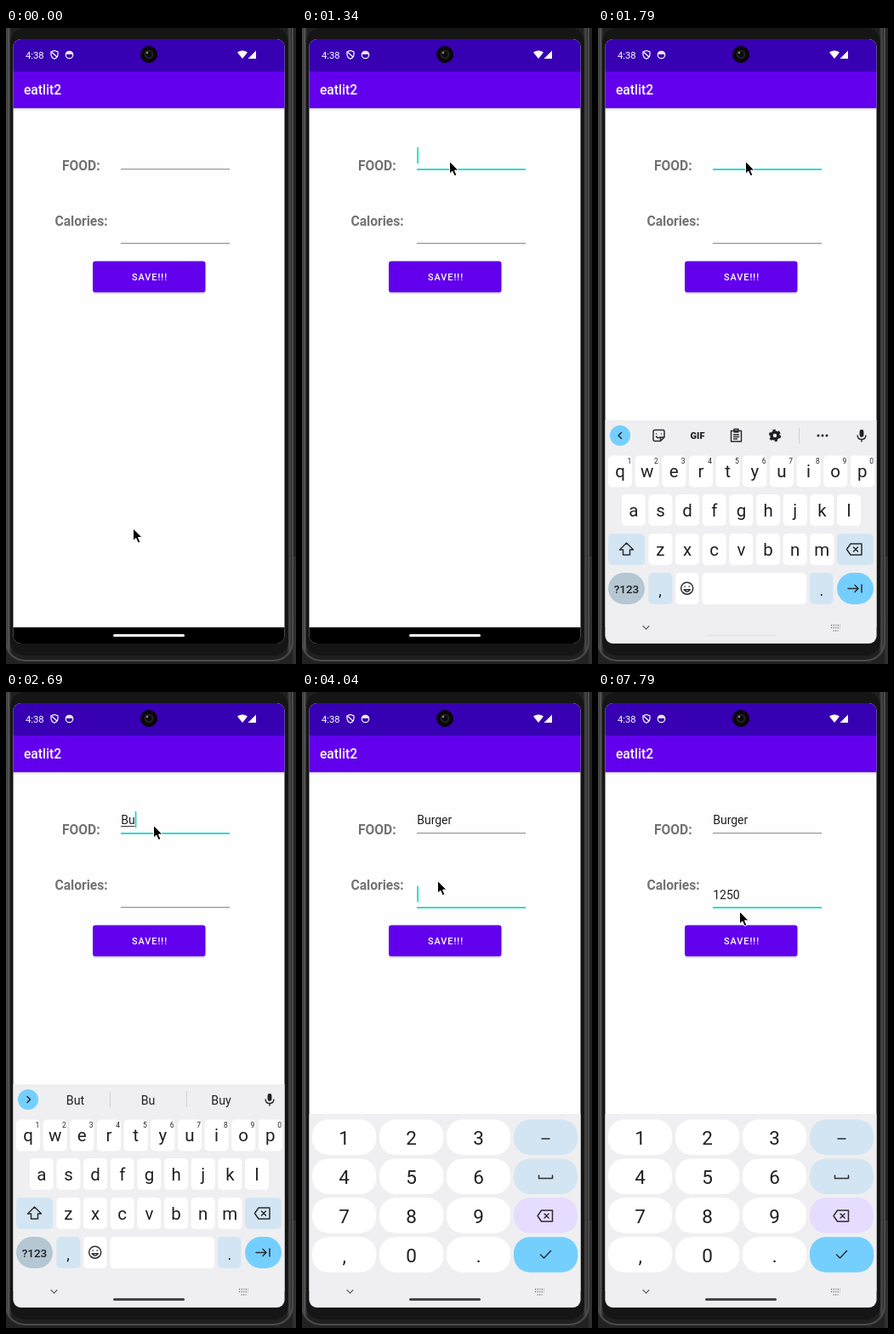
An HTML page that plays this animation: 341x746 px, repeating every 8 s.

```html
<!DOCTYPE html>
<html lang="en">
<head>
<meta charset="utf-8">
<title>Calorie form</title>
<style>
html, body { margin: 0; width: 100%; height: 100%; overflow: hidden; background: #1c1c1c; }
svg { display: block; width: 100%; height: 100%; font-family: Roboto, Arial, sans-serif; }
.mid { text-anchor: middle; }
.icon { fill: none; stroke: #2b2d30; stroke-width: 1.5; stroke-linecap: round; stroke-linejoin: round; }
</style>
</head>
<body>
<svg viewBox="0 0 341 746">
  <defs>
    <clipPath id="screen"><rect x="8.5" y="13" width="319" height="709" rx="9"/></clipPath>
    <linearGradient id="side">
      <stop offset="0" stop-color="#181818"/><stop offset=".008" stop-color="#5a5a5a"/>
      <stop offset=".018" stop-color="#202020"/><stop offset=".98" stop-color="#202020"/>
      <stop offset=".99" stop-color="#4a4a4a"/><stop offset="1" stop-color="#181818"/>
    </linearGradient>
    <linearGradient id="fade" x2="0" y2="1">
      <stop offset="0" stop-color="#000" stop-opacity=".2"/><stop offset="1" stop-color="#000" stop-opacity="0"/>
    </linearGradient>
  </defs>

  <!-- phone body -->
  <rect width="341" height="746" fill="#222"/>
  <rect x="337" y="620" width="4" height="126" fill="#303030"/>
  <rect x="0" y="-40" width="337" height="782" rx="22" fill="url(#side)" stroke="#4b4b4b" stroke-width="2"/>
  <rect x="5" y="0" width="327" height="736" rx="16" fill="#151515"/>

  <g clip-path="url(#screen)">
    <rect x="8" y="13" width="320" height="709" fill="#fefefe"/>
    <rect x="8" y="13" width="320" height="38" fill="#3700b3"/>
    <rect x="8" y="51" width="320" height="43" fill="#6200ee"/>
    <rect x="8" y="94" width="320" height="3" fill="url(#fade)"/>
    <rect x="8" y="703" width="320" height="19"/>

    <g fill="#fff">
      <text x="23" y="36" font-size="11.2">4:38</text>
      <path d="M272 28.5Q278 24.5 284 28.5L278 36ZM294 26.5V36H284.5Z"/>
      <text x="21" y="78" font-size="15.6" font-weight="500">eatlit2</text>
    </g>
    <g fill="none" stroke="#fff" stroke-width="1.2">
      <path d="M57 26.5L61 28V31Q61 34.5 57 36.3Q53 34.5 53 31V28ZM54 28.5L60 34"/>
      <circle cx="74.5" cy="31.5" r="4.2"/><path d="M71 29.5H78" stroke-width="2.4"/>
    </g>
    <circle cx="168" cy="31" r="10" fill="#080808"/>
    <circle cx="168" cy="31" r="5.5" fill="#202020"/>
    <circle cx="168" cy="31" r="3.2" fill="#080808"/>
    <circle cx="166" cy="29" r="1.5" fill="#777"/>

    <g font-size="15.6" font-weight="700" fill="#737373">
      <text x="66" y="167">FOOD:</text><text x="57.5" y="231.5">Calories:</text>
    </g>
    <rect id="line0" x="135" y="165" width="128"/>
    <rect id="line1" x="135" y="252" width="128"/>
    <g font-size="14" fill="#202020">
      <text id="text0" x="135.2" y="155"></text><text id="text1" x="135.2" y="242.5"></text>
    </g>
    <rect id="compose" x="135" y="157" height="1" fill="#333"/>
    <rect id="caret" width="1.6" height="19" fill="#03dac5"/>

    <rect x="102" y="275" width="132.5" height="37" rx="3.5" fill="#000" opacity=".16"/>
    <rect x="102" y="273.5" width="132.5" height="36.5" rx="3" fill="#6200ee"/>
    <text class="mid" x="169" y="296.4" font-size="10.9" font-weight="500" letter-spacing=".97" fill="#fff">SAVE!!!</text>

    <g id="letters"></g>
    <g id="numbers"></g>
    <rect id="pill" x="126" y="711" width="84" height="3" rx="1.5"/>
  </g>
  <path id="mouse" d="M0 0V14.5L3.3 11.5L5.8 17L8.4 15.9L6 10.5H10.6Z" fill="#000" stroke="#fff" stroke-width="1"/>
</svg>

<script>
const $ = id => document.getElementById(id);
const INK = "#1f2023", PALE = "#d3e5f2", SKY = "#74cfff", TEAL = "#03dac5";

const key = (x, y, w, h, r, fill = "#fff") =>
  `<rect x="${x}" y="${y}" width="${w}" height="${h}" rx="${r}" fill="${fill}"/>`;
const label = (s, x, y, size, extra = "") =>
  `<text class="mid" x="${x}" y="${y}" font-size="${size}" fill="${INK}" ${extra}>${s}</text>`;
const icon = (x, y, d, extra = "") =>
  `<path class="icon" transform="translate(${x} ${y})" d="${d}" ${extra}/>`;
const erase = (x, y) => icon(x, y, "M-9 0L-4.5-6.5H8.5V6.5H-4.5ZM-1-2.5L4 2.5M4-2.5L-1 2.5");
const dot = "a.7 .7 0 1 0 .1 0";

const panel = top => `<rect x="8" y="${top}" width="320" height="${722 - top}" fill="#efeff1"/>` +
  icon(56.5, 703.5, "M-3.5-2L0 1.5L3.5-2", 'style="stroke:#666;stroke-width:1.2"') +
  icon(279.5, 703.5, "M-5.5-3H5.5M-5.5 0H5.5M-3 3.5H3", 'style="stroke:#777;stroke-width:1.6;stroke-dasharray:1.2 1.4;stroke-linecap:butt"');

function letterPad() {
  let s = panel(460) + `<circle cx="26" cy="478" r="12" fill="${SKY}"/><path id="arrow" class="icon" d="M0-3.5L-3.5 0L0 3.5"/>`;
  s += '<g id="tools">' +
    icon(71.5, 478, "M-6.5-4.5Q-6.5-6.5-4.5-6.5H4.5Q6.5-6.5 6.5-4.5V2L2 6.5H-4.5Q-6.5 6.5-6.5 4.5ZM6 2H2V6M-3-2V-2M3-2V-2M-3 1Q-1 4 1 2") +
    label("GIF", 117, 482, 11, 'font-weight="900"') +
    icon(162.5, 478, "M-6-5.5H6V7H-6ZM-2.5-7.5H2.5V-4H-2.5ZM-3-1H3M-3 1.5H3M-3 4H1") +
    `<circle cx="208" cy="478" r="4" fill="none" stroke="${INK}" stroke-width="3.6"/>` +
    `<circle cx="208" cy="478" r="6.2" fill="none" stroke="${INK}" stroke-width="2" stroke-dasharray="3.2 3.29"/>` +
    '<path d="M236.5 469V487" stroke="#d0d1d3"/>' +
    [259, 264, 269].map(x => `<circle cx="${x}" cy="478" r="1.5" fill="${INK}"/>`).join("") + "</g>";
  s += '<g id="hints"><path d="M122.5 468V487M212.5 468V487" stroke="#d0d1d3"/>' +
    [81.5, 167, 253].map((x, i) => `<text id="hint${i}" class="mid" x="${x}" y="483.5" font-size="14.2" fill="${INK}"></text>`).join("") +
    '<g id="burger"><path d="M246.5 477Q247 470.5 253.5 470.5T260.5 477Z" fill="#e9a044"/>' +
    '<path d="M246 477.3H261" stroke="#7eae35" stroke-width="2"/><path d="M246.5 479H260.5" stroke="#e34b31" stroke-width="1.6"/>' +
    '<path d="M246.5 481H260.5" stroke="#663724" stroke-width="2.6"/><path d="M247 482.3H260Q260 485.5 257 485.5H250Q247 485.5 247 482.3" fill="#e4993b"/></g></g>';
  s += `<rect x="307.6" y="471" width="4.8" height="9" rx="2.4" fill="${INK}"/>` + icon(310, 478, "M-4.8 0Q-4.8 4.5 0 4.5T4.8 0M0 4.5V7");

  const row = (chars, x0, y) => [...chars].forEach((c, i) => {
    const x = x0 + i * 31.65;
    s += key(x, y, 28, 37, 5) + label(c, x + 14, y + 25.7, 20.5);
    if (chars.length > 9) s += label((i + 1) % 10, x + 24.8, y + 9.5, 8.5);
  });
  row("qwertyuiop", 12, 501.5);
  row("asdfghjkl", 27.8, 547);
  row("zxcvbnm", 59.4, 593);
  s += key(12, 593, 43, 37, 5, PALE) + icon(33.5, 611.5, "M0-7.5L8 .5H4V6.5H-4V.5H-8Z");
  s += key(281, 593, 43, 37, 5, PALE) + erase(301.5, 611.5);
  s += key(12, 639, 43, 37, 18.5, "#b4c7d3") + label("?123", 33.5, 662.5, 13.5, 'font-weight="500"');
  s += key(59.4, 639, 28, 37, 5, PALE) + label(",", 73, 666, 18);
  s += key(91, 639, 27.5, 37, 5) + icon(104.7, 657.2, "M-7 0A7 7 0 1 1 7 0A7 7 0 1 1-7 0M-2.5-2V-2.1M2.5-2V-2.1M-3.5 1.5Q0 6.5 3.5 1.5Z");
  s += key(122.5, 639, 122.5, 37, 5);
  s += key(249, 639, 27.5, 37, 5, PALE) + label(".", 262.8, 666, 18);
  s += key(281, 639, 43, 37, 18.5, SKY) + icon(302, 657.5, "M-8 0H4M0-4L4 0L0 4M8-4.5V4.5");
  return s;
}

function numberPad() {
  let s = panel(495);
  const sideFill = [PALE, PALE, "#e6dcff", SKY];
  ["123", "456", "789", ",0."].forEach((chars, r) => {
    const y = 501.5 + r * 45.9;
    [...chars].forEach((c, i) => s += key(12 + i * 79, y, 75.3, 41.5, 19) + label(c, 49.6 + i * 79, y + 29.5, 22.5));
    s += key(249, y, 75.3, 41.5, 19, sideFill[r]);
  });
  return s + icon(286.5, 524, "M-4.5 0H4.5") + icon(286.5, 568.5, "M-8-1.5V2H8V-1.5") +
    erase(286, 614.5) + icon(286.5, 660, "M-6 0L-2 4L6-4.5");
}
$("letters").innerHTML = letterPad();
$("numbers").innerHTML = numberPad();
$("arrow").style.strokeWidth = 1.6;

// Each track is [start, value] pairs; a value holds until the next start.
const at = (track, t) => track.reduce((v, [start, value]) => t >= start ? value : v, track[0][1]);
const food = [[0, ""], [2540, "B"], [2690, "Bu"], [2840, "Burg"], [2990, "Burge"], [3290, "Burger"]];
const calories = [[0, ""], [4790, "1"], [4940, "12"], [5390, "125"], [5990, "1250"], [6290, "12500"], [7340, "1250"]];
const focus = [[0, -1], [1190, 0], [3740, 1]];
const caretOn = [[0, 0], [1340, 1], [1790, 0], [2540, 1], [3740, 0], [4040, 1], [4490, 0], [4790, 1], [6890, 0], [7340, 1], [7790, 0]];
const pad = [[0, ""], [1640, "letters"], [3890, "numbers"]];
const pillFill = [[0, "#fff"], [1640, "#e8e8ea"], [2240, "#98999b"], [2540, "#444648"]];
const hints = [[0, ""], [2540, "B,Be,But"], [2690, "But,Bu,Buy"], [2840, "Burger,Burg,Burgers"], [3290, "Burger,Burgers,"], [3740, ""]];
const laterMouse = [[0, [173.5, 156.5]], [3290, [169, 178]], [3440, [163.5, 203.5]], [3590, [159.5, 221.5]],
  [6590, [162, 239]], [6740, [166.5, 257.5]]];

function mouseAt(t) {
  if (t >= 1190) return at(laterMouse, t);
  const p = Math.min(1, Math.floor(t / 150) / 7), e = p * p * (3 - 2 * p);
  return [149.5 + 24 * e - 74 * e * (1 - e), 587 - 430.5 * e];
}

const show = (id, on) => $(id).style.display = on ? "" : "none";
const set = (id, attrs) => Object.entries(attrs).forEach(([k, v]) => $(id).setAttribute(k, v));

function draw(t) {
  const f = at(focus, t), p = at(pad, t), words = at(hints, t);
  $("text0").textContent = at(food, t);
  $("text1").textContent = at(calories, t);
  const widths = [0, 1].map(i => $("text" + i).getComputedTextLength());
  [0, 1].forEach(i => set("line" + i, { fill: f === i ? TEAL : "#8a8a8a", height: f === i ? 1.7 : 1 }));
  set("compose", { width: f === 0 ? widths[0] : 0 });
  show("caret", at(caretOn, t));
  set("caret", { x: 135.3 + (widths[f] || 0), y: f === 1 ? 227.5 : 140 });

  show("letters", p === "letters");
  show("numbers", p === "numbers");
  set("letters", { transform: `translate(0 ${t < 1790 ? 60 : 0})` });
  show("tools", !words);
  show("hints", words);
  words.split(",").forEach((w, i) => $("hint" + i).textContent = w);
  show("burger", words.endsWith(","));
  set("arrow", { transform: words ? "translate(25 478) scale(-1 1)" : "translate(27.5 478)" });
  set("pill", { fill: at(pillFill, t) });
  set("mouse", { transform: `translate(${mouseAt(t)})` });
}

function tick(now) {
  draw(now % 8000);
  requestAnimationFrame(tick);
}
draw(0);
requestAnimationFrame(tick);
</script>
</body>
</html>
```
